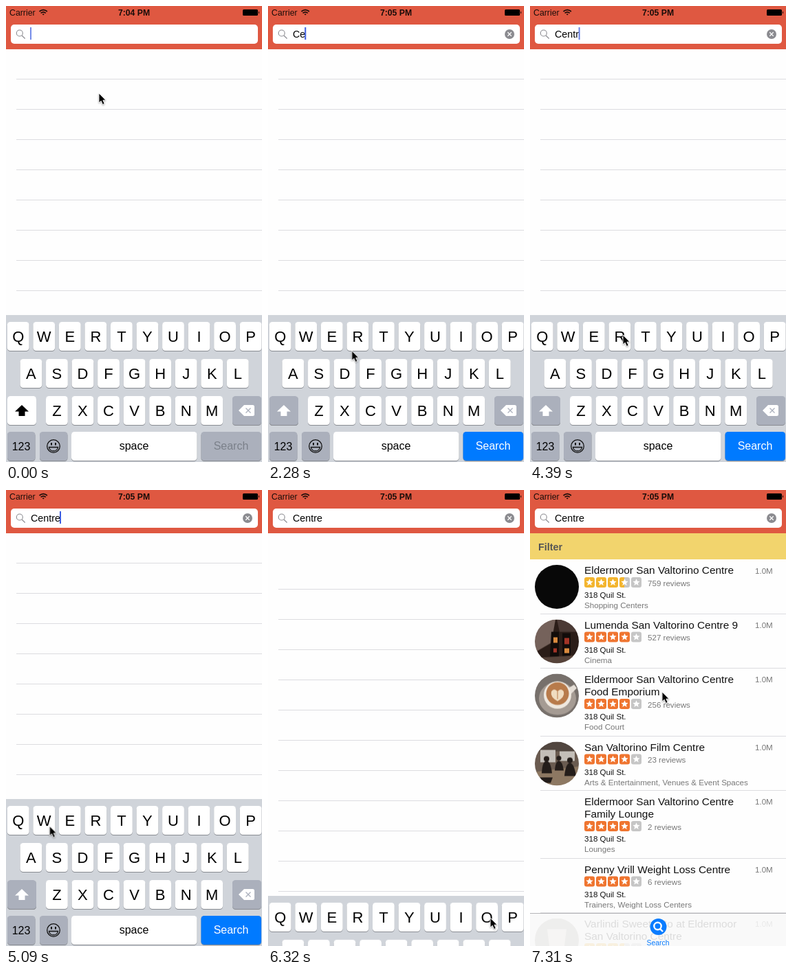
Recreate the animation shown at these times as an HTML page. Size 372 by 664 pixels, loop 8 s.

```html
<!DOCTYPE html>
<html lang="en">
<head>
<meta charset="utf-8">
<title>Search demo</title>
<style>
html, body { margin: 0; width: 100%; height: 100%; overflow: hidden; background: #fff; }
svg { display: block; width: 372px; height: 664px; font-family: "Liberation Sans", Arial, sans-serif; }
.mid { text-anchor: middle; }
.key { fill: #fff; }
.dim { fill: #abb0bc; }
.key-shadow { fill: #888b91; }
.cap { font-size: 22px; text-anchor: middle; }
.word { font-size: 16px; text-anchor: middle; }
.title { font-size: 15.4px; fill: #111; }
.small { font-size: 11.6px; fill: #777; }
.addr { font-size: 11.6px; fill: #111; }
.line { stroke: #dcdce0; }

.clock-old, .clock-new, .before, .typed, .results, .photos, .caret, .empty { animation: 8s step-end infinite; }
.clock-old { animation-name: clock-old; }
.clock-new { animation-name: clock-new; }
.before { animation-name: before; }
.typed { animation-name: typed; }
.results { animation-name: results; }
.photos { animation-name: photos; }
.caret { animation-name: caret; }
.empty { animation-name: inset; }
.bar { animation: blink 8s linear infinite; }
.keyboard { animation: drop 8s linear infinite; }
.pointer { animation: move 8s linear infinite; filter: drop-shadow(0 1px 1px #0005); }

@keyframes clock-old { 0% { opacity: 1 } 1%, 100% { opacity: 0 } }
@keyframes clock-new { 0% { opacity: 0 } 1%, 100% { opacity: 1 } }
@keyframes before { 0% { opacity: 1 } 18.6%, 100% { opacity: 0 } }
@keyframes typed { 0% { opacity: 0 } 18.6%, 100% { opacity: 1 } }
@keyframes results { 0% { opacity: 0 } 84.6%, 100% { opacity: 1 } }
@keyframes photos { 0% { opacity: 0 } 85.7%, 100% { opacity: 1 } }
@keyframes inset { 0% { transform: none } 77.8%, 100% { transform: translateY(38px) } }
@keyframes caret {
  0% { transform: none }
  18.6% { transform: translateX(10.3px) }
  26.2% { transform: translateX(18.3px) }
  37.2% { transform: translateX(26.2px) }
  46.1% { transform: translateX(30.2px) }
  54.8% { transform: translateX(35.6px) }
  61.5%, 100% { transform: translateX(43px) }
}
@keyframes blink {
  0% { opacity: .7 }
  1%, 5.5% { opacity: 1 }
  7%, 12.5% { opacity: 0 }
  14%, 17% { opacity: 1 }
  18.6% { opacity: .75 }
  19.5%, 31.5% { opacity: 1 }
  33%, 35% { opacity: 0 }
  36.5%, 42.5% { opacity: 1 }
  43.5%, 45% { opacity: 0 }
  46.1%, 53.5% { opacity: 1 }
  54.9% { opacity: .75 }
  56%, 67% { opacity: 1 }
  68.2%, 74% { opacity: 0 }
  75.6%, 77.8% { opacity: 1 }
  77.81%, 100% { opacity: 0 }
}
@keyframes drop {
  0% { transform: none }
  77.6% { transform: none; animation-timing-function: cubic-bezier(.215, .61, .355, 1) }
  82.6%, 100% { transform: translateY(216px) }
}
@keyframes move {
  0%, .9% { transform: translate(135px, 127px) }
  2.1%, 3.3% { transform: translate(150px, 401px) }
  5.5% { transform: translate(147px, 520px) }
  8.5%, 19.6% { transform: translate(151px, 587px) }
  23%, 27.2% { transform: translate(91px, 482px) }
  31% { transform: translate(180px, 540px) }
  35%, 38.8% { transform: translate(256.5px, 585px) }
  39.8% { transform: translate(284px, 568px) }
  43.5%, 46.1% { transform: translate(167px, 484px) }
  48.4% { transform: translate(182px, 396px) }
  50.5%, 55.2% { transform: translate(135px, 479px) }
  58.2%, 62.4% { transform: translate(90px, 479px) }
  63.7% { transform: translate(62px, 490px) }
  67.5% { transform: translate(270px, 595px) }
  70.1%, 80% { transform: translate(323px, 623px) }
  82.4%, 83.6% { transform: translate(262px, 430px) }
  85.7%, 100% { transform: translate(192px, 294px) }
}
</style>
</head>
<body>
<svg viewBox="0 0 372 664">
  <defs>
    <clipPath id="disc"><circle cx="32" cy="32" r="32"/></clipPath>
    <linearGradient id="half"><stop offset=".5" stop-color="#f3b52f"/><stop offset=".5" stop-color="#c6c6c6"/></linearGradient>
    <path id="star" fill="#fff" d="M0-5.2L1.5-1.7 5.1-1.5 2.3.9 3.2 4.5 0 2.5-3.2 4.5-2.3.9-5.1-1.5-1.5-1.7z"/>
  </defs>
  <rect width="372" height="664" fill="#fefefe"/>
  <g class="empty line" id="lines"></g>

  <g class="results">
    <rect y="63" width="372" height="601" fill="#fefefe"/>
    <g id="rows"></g>
    <rect y="63" width="372" height="38" fill="#f2d46d"/>
    <text x="12" y="87.5" font-size="14.4" font-weight="bold" fill="#555">Filter</text>
  </g>

  <g>
    <rect y="616" width="372" height="48" fill="#f9f9f9" opacity=".88"/>
    <path d="M0 616.5H372" stroke="#b5b5b8"/>
    <circle cx="186.5" cy="636" r="12" fill="#0a7cff"/>
    <g fill="none" stroke="#fff" stroke-width="2.4"><circle cx="185.5" cy="635" r="5.2"/><path d="M189 639l4 4"/></g>
    <text class="mid" x="186" y="662.5" font-size="10.4" fill="#0a7cff">Search</text>
  </g>

  <rect width="372" height="63" fill="#df5841"/>
  <text x="5" y="14" font-size="12.3" fill="#1a0d0a">Carrier</text>
  <g fill="none" stroke="#1a0d0a" stroke-width="1.7">
    <path d="M48.5 8q5.700-4.600 11.400 0M50.600 10.300q3.600-2.800 7.200 0"/>
    <path d="M54.200 13.600l-1.600-1.900q1.600-1.100 3.200 0z" fill="#1a0d0a" stroke="none"/>
  </g>
  <g class="mid" font-size="12.2" font-weight="bold" fill="#1a0d0a">
    <text class="clock-old" x="186" y="14">7:04 PM</text>
    <text class="clock-new" x="186" y="14">7:05 PM</text>
  </g>
  <rect x="344" y="5" width="22" height="9" rx="1.500"/>
  <path d="M367 7.500q2 2 0 4z"/>

  <rect x="7" y="27" width="359" height="28" rx="5" fill="#fff"/>
  <g fill="none" stroke="#8a8a8f" stroke-width="1.1"><circle cx="19.800" cy="39.500" r="4.500"/><path d="M23 43l4.700 4.500"/></g>
  <text x="36" y="46" font-size="14.3">Centre</text>
  <g class="caret">
    <rect x="36" y="30" width="60" height="22" fill="#fff"/>
    <rect class="bar" x="35" y="31" width="2" height="18" fill="#3b5ce0"/>
  </g>
  <g class="typed">
    <circle cx="351" cy="41" r="7" fill="#8b8b90"/>
    <path d="M348.300 38.300l5.400 5.400m0-5.400l-5.400 5.400" stroke="#fff" stroke-width="1.300"/>
  </g>

  <g class="keyboard">
    <rect y="450" width="372" height="216" fill="#d0d4da"/>
    <g id="keys"></g>
    <g class="before"><path d="M23 581l10 9.500h-5.500v6.500h-9v-6.500H13z"/></g>
    <g class="typed"><path fill="#fff" d="M23 581l10 9.500h-5.500v6.500h-9v-6.500H13z"/></g>
    <path fill="#fff" d="M346 581h12.500q2.500 0 2.500 2.500v11q0 2.500-2.500 2.500H346l-8-8z"/>
    <path d="M348.500 585.500l7 7m0-7l-7 7" stroke="#abb0bc" stroke-width="1.300"/>
    <g fill="none" stroke="#111" stroke-width="1.300">
      <circle cx="69" cy="641" r="9.300"/>
      <path d="M62.500 642.500h13q-1 5.500-6.500 5.500t-6.500-5.500z"/>
      <path d="M66 636v3.500M72 636v3.500" stroke-width="2"/>
    </g>
  </g>

  <path class="pointer" d="M0 0V14L3.200 11.200 5.500 16.500 8.200 15.300 5.900 10.200H10z" stroke="#fff" stroke-width=".9"/>
</svg>
<script>
const put = (id, html) => document.getElementById(id).innerHTML = html;
const text = (cls, x, y, s) => `<text class="${cls}" x="${x}" y="${y}">${s}</text>`;
const rule = y => `<path class="line" d="M15 ${y}H372"/>`;
const seq = (n, fn) => Array.from({ length: n }, (_, i) => fn(i)).join('');

put('lines', seq(12, i => rule(106.5 + 44 * i)));

// Keyboard
const box = (x, y, w, cls) => `<rect class="${cls}" x="${x}" y="${y}" width="${w}" height="42" rx="4.5"/>`;
const key = (x, y, w, cls = 'key') => box(x, y + 1, w, 'key-shadow') + box(x, y, w, cls);
const letters = (s, x, y) => seq(s.length, i => {
  const left = x + 37.55 * i;
  return key(left, y, 31.8) + text('cap', left + 15.9, y + 29, s[i]);
});
put('keys',
  letters('QWERTYUIOP', 1.8, 460) + letters('ASDFGHJKL', 20.5, 514) + letters('ZXCVBNM', 58, 568) +
  key(2, 568, 42) + `<g class="typed">${key(2, 568, 42, 'dim')}</g>` + key(329, 568, 42, 'dim') +
  key(2, 620, 40.5, 'dim') + text('word', 22, 646.5, '123') +
  key(49, 620, 40.5, 'dim') +
  key(95, 620, 182.5) + text('word', 186, 646, 'space') +
  key(283.5, 620, 87.5, 'dim') + `<g fill="#7b808a">${text('word', 327, 646, 'Search')}</g>` +
  `<g class="typed">${box(283.5, 620, 87.5, '" fill="#007aff')}<g fill="#fff">${text('word', 327, 646, 'Search')}</g></g>`);

// Results
const photos = {
  mark: '<rect width="64" height="64" fill="#080808"/>',
  cinema: `<rect width="64" height="64" fill="#2b1d18"/><path d="M0 0H30L24 34 0 48z" fill="#75625b"/>
    <path d="M32 0H64V18H36z" fill="#4b3a35"/><path d="M24 18h11v36H22zM40 20h12v36H40z" fill="#120c0a"/>
    <path d="M27 26h6v8h-6zM43 42h7v7h-7z" fill="#d98a3e"/><path d="M43 27h7v9h-7zM27 42h5v6h-5z" fill="#a33427"/>
    <path d="M0 56l64-4v12H0z" fill="#56433a"/>`,
  latte: `<rect width="64" height="64" fill="#77706b"/><ellipse cx="33" cy="36" rx="27" ry="24" fill="#a59b93"/>
    <path d="M47 22l10-6 4 5-9 9z" fill="#e5ded6"/><circle cx="33" cy="31" r="20" fill="#efe8df"/>
    <circle cx="33" cy="29" r="16.500" fill="#b87b4b"/>
    <path d="M33 40q-11-6-9-14 4-6 9 0 5-6 9 0 2 8-9 14z" fill="#f0dcc0"/><path d="M33 26v11" stroke="#b87b4b"/>`,
  hall: `<rect width="64" height="64" fill="#6a5b50"/><path d="M0 0H64V14H0z" fill="#51463f"/>
    <path d="M8 12h22v18H8zM36 14h22v14H36z" fill="#c3beb8"/><path d="M0 44l64-8v28H0z" fill="#8d7862"/>
    <g fill="#241d1a"><circle cx="17" cy="25" r="4"/><path d="M10 46q1-18 7-18t8 18z"/><circle cx="35" cy="24" r="3.500"/>
    <path d="M29 42q1-14 6-14t7 14z"/><circle cx="51" cy="27" r="4"/><path d="M43 50q2-19 8-19t9 19z"/><path d="M4 52h22l-3 8H8z"/></g>`,
  shop: '<rect width="64" height="64" fill="#a7a09a"/><path d="M18 16h28l-5 40H23z" fill="#e6dfd6"/>'
};
const mall = 'Eldermoor San Valtorino Centre';
const places = [
  [101, [mall], 3.5, 759, 'Shopping Centers', 'mark'],
  [180.5, ['Lumenda San Valtorino Centre 9'], 4, 527, 'Cinema', 'cinema'],
  [259.5, [mall, 'Food Emporium'], 4, 256, 'Food Court', 'latte'],
  [358.5, ['San Valtorino Film Centre'], 4, 23, 'Arts &amp; Entertainment, Venues &amp; Event Spaces', 'hall'],
  [437.5, [mall, 'Family Lounge'], 4, 2, 'Lounges'],
  [536.5, ['Penny Vrill Weight Loss Centre'], 4, 6, 'Trainers, Weight Loss Centers'],
  [615.5, ['Varlindi Sweets Co at Eldermoor', 'San Valtorino Centre'], 3.5, 84, 'Desserts', 'shop']
];
const stars = (y, score) => seq(5, i => {
  const on = score % 1 ? '#f3b52f' : '#ef7530';
  const fill = i + 1 <= score ? on : i < score ? 'url(#half)' : '#c6c6c6';
  return `<rect x="${79 + 17 * i}" y="${y}" width="15" height="15" rx="3" fill="${fill}"/>
    <use href="#star" x="${86.5 + 17 * i}" y="${y + 7.5}"/>`;
});
put('rows', places.map(([top, names, score, count, kind, photo]) => {
  const y = top + 18.5 * (names.length - 1);
  return (top > 101 ? rule(top) : '') +
    names.map((s, i) => text('title', 79, top + 21 + 18.5 * i, s)).join('') +
    text('small', 327, top + 20.5, '1.0M') +
    stars(y + 26, score) + text('small', 171, y + 38.5, `${count} reviews`) +
    text('addr', 79, y + 56, '318 Quil St.') + text('small', 79, y + 71, kind) +
    (photo ? `<g class="photos"><g transform="translate(7 ${top + 8})" clip-path="url(#disc)">${photos[photo]}</g></g>` : '');
}).join(''));
</script>
</body>
</html>
```
